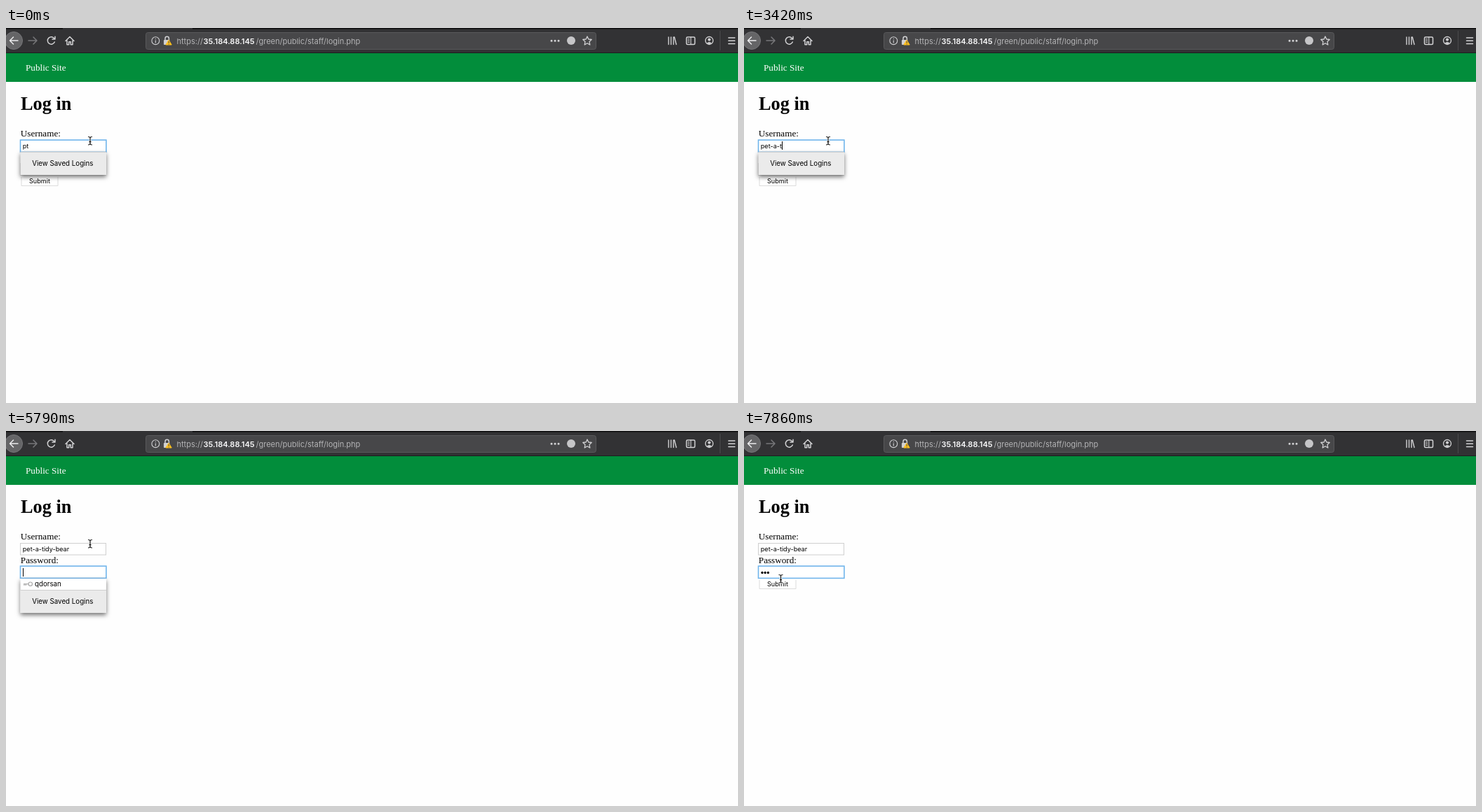
Recreate the animation shown at these times as an HTML page. Size 1044 by 536 pixels, loop 8000 ms.

```html
<!DOCTYPE html>
<html lang="en">
<head>
<meta charset="utf-8">
<title>Log in</title>
<style>
  html, body { margin: 0; width: 100%; height: 100%; overflow: hidden; background: #fefefe; }
  svg { display: block; }
  text { white-space: pre; }
  .serif { font: 13.2px "Liberation Serif", serif; }
  .ui { font: 9.1px Inter, sans-serif; }
  .menu { font: 9.75px Inter, sans-serif; }
  .url { font: 11px Inter, sans-serif; fill: #b4b4b6; }
  .icon { fill: none; stroke: #d2d2d4; stroke-width: 1.5; stroke-linecap: round; stroke-linejoin: round; }
  .idle { fill: #fff; stroke: #cfcfcf; }
  .focus { fill: #fff; stroke: #70b5ec; stroke-width: 1.6; }
  .popup { filter: drop-shadow(0 3px 3px rgba(0, 0, 0, .55)); }
</style>
</head>
<body>
<svg width="1044" height="536" viewBox="0 0 1044 536">
  <!-- browser toolbar -->
  <rect width="1044" height="36" fill="#323234"/>
  <path d="M0 .7H81M266 .7H1044" stroke="#0c0c0d" stroke-width="1.4"/>
  <path d="M0 35.5H1044" stroke="#1d1d1f"/>
  <rect x="199.5" y="6.5" width="642" height="24" rx="3" fill="#474749" stroke="#59595b"/>
  <circle cx="11" cy="18" r="12.5" fill="#656567" stroke="#77777a"/>
  <path d="M1018.5 4V32" stroke="#4b4b4d"/>
  <g class="icon">
    <path d="M17 18H5.5M10.5 13L5.5 18L10.5 23" stroke="#ececee"/>
    <path d="M32 18H44M39 13L44 18L39 23" stroke="#77777a"/>
    <path d="M69 15.3A5.2 5.2 0 1 0 69.3 20M70 12.3V16H66"/>
    <path d="M85 18.5L91 12.5L97 18.5M87 18V23.8H89.7V19.8H92.3V23.8H95V18"/>
    <g stroke-width="1.1">
      <circle cx="213.3" cy="18.2" r="5.4"/>
      <path d="M213.3 17.8V21M213.3 15.4V15.6"/>
    </g>
    <path d="M227 17V15A2.7 2.7 0 0 1 232.4 15V17"/>
    <rect x="225.8" y="17.5" width="7" height="6" fill="#d2d2d4" stroke-width="1"/>
    <path d="M232.2 17.5L236.2 24H228.2Z" fill="#ffbf1c" stroke="#ffbf1c" stroke-width="1"/>
    <path d="M232.2 19.2V21.4M232.2 23.2V23.3" stroke="#474749" stroke-width="1"/>
    <path d="M778 18.3H778.1M783 18.3H783.1M788 18.3H788.1" stroke-width="3"/>
    <path d="M829 12L830.8 16L835.2 16.5L832 19.5L832.8 24L829 21.8L825.2 24L826 19.5L822.8 16.5L827.2 16Z" stroke-width="1.3"/>
    <path d="M945 13V23.5M948.5 13V23.5M952 13V23.5M953.3 13L956 23.5" stroke-width="1.4"/>
    <rect x="970.5" y="13" width="12" height="10.5" rx="1.5"/>
    <path d="M976.8 13V23.5M972.6 15.7H974.6M972.6 18H974.6M972.6 20.3H974.6" stroke-width="1.1"/>
    <circle cx="1003" cy="18" r="5.5" stroke-width="1.3"/>
    <path d="M999.8 21.8Q1003 18.6 1006.2 21.8Q1003 24 999.8 21.8Z" fill="#d2d2d4" stroke-width=".6"/>
    <circle cx="1003" cy="16.6" r="1.8" fill="#d2d2d4" stroke-width=".5"/>
    <path d="M1030.5 14H1039.5M1030.5 18.2H1039.5M1030.5 22.4H1039.5"/>
  </g>
  <circle cx="806" cy="18" r="6" fill="#c6c6c8"/>
  <text class="url" y="22.5"><tspan x="243.5">https://</tspan><tspan x="281.5" fill="#f9f9fa" font-weight="600">35.184.88.145</tspan><tspan x="356.5">/green/public/staff/login.php</tspan></text>

  <!-- page -->
  <rect y="36" width="1044" height="41" fill="#028d3b"/>
  <text class="serif" x="28" y="60.5" fill="#fff">Public Site</text>
  <text x="21" y="116.5" style="font: bold 26.3px 'Liberation Serif', serif">Log in</text>
  <text class="serif" x="20.8" y="155">Username:</text>
  <text class="serif" x="20.8" y="188.5">Password:</text>
  <rect id="userBox"/>
  <rect id="passBox"/>
  <path d="M22 213V225.5H74V213" fill="#fff" stroke="#dcdcdc"/>
  <text class="ui" x="48" y="222.3" text-anchor="middle">Submit</text>
  <text id="userText" class="ui" x="23.8" y="172"/>
  <g id="dots">
    <circle cx="26" cy="202.5" r="1.65"/>
    <circle cx="30.2" cy="202.5" r="1.65"/>
    <circle cx="34.4" cy="202.5" r="1.65"/>
  </g>
  <rect id="caret" width="1" height="12"/>

  <!-- suggestion popups -->
  <g id="passPopup" class="popup">
    <rect x="20.5" y="211" width="122.5" height="49" fill="#fff"/>
    <circle cx="34.8" cy="218.7" r="2.7" fill="none" stroke="#aaa" stroke-width="1.2"/>
    <path d="M25 218.7H32M26 219V221M28.3 219V221" stroke="#aaa" stroke-width="1.2"/>
    <text class="menu" x="41" y="222">qdorsan</text>
  </g>
  <g id="savedLogins">
    <rect x="20.5" y="177.5" width="122.5" height="32.5" fill="#ebebeb"/>
    <path d="M20.5 177.5H143" stroke="#cfcfcf"/>
    <text class="menu" x="80.8" y="197" text-anchor="middle">View Saved Logins</text>
  </g>

  <g id="pointer" fill="none">
    <path id="beam" d="M-3 -5.5Q-.3 -5.5 0 -4Q.3 -5.5 3 -5.5M-3 6Q-.3 6 0 4.5Q.3 6 3 6M0 -4V4.5M-1.5 1.7H1.5" stroke="#fff" stroke-width="2.4"/>
    <use href="#beam" style="stroke: #000"/>
    <path d="M-3 -5.5Q-.3 -5.5 0 -4Q.3 -5.5 3 -5.5M-3 6Q-.3 6 0 4.5Q.3 6 3 6M0 -4V4.5M-1.5 1.7H1.5" stroke="#111" stroke-width="1.2"/>
  </g>
</svg>
<script>
const LOOP = 8000, TAB = 5790, FIRST_DOT = 6840, LAST_DOT = 7130;
const $ = id => document.getElementById(id);
const userName = "pet-a-tidy-bear";

// [time, text or length of the typed prefix, caret shown]
const typing = [
  [0, "pt", 0], [150, "pte", 0], [290, "pt", 0],
  [590, 1, 1], [740, 2, 1], [880, 1, 1], [1180, 2, 1], [1470, 3, 1], [1920, 3, 0],
  [2220, 4, 1], [2520, 5, 0], [2970, 5, 1], [3120, 6, 1],
  [3420, 7, 1], [3570, 8, 1], [3710, 9, 1], [3860, 10, 1], [4160, 10, 0],
  [4460, 11, 1], [4760, 11, 0],
  [5060, 12, 1], [5210, 13, 1], [5350, 14, 1], [5650, 15, 1]
];

function show(id, visible) {
  $(id).style.display = visible ? "" : "none";
}

function setField(id, y, focused) {
  const grow = focused ? .4 : 0;
  const box = { x: 20.5, y: y - grow, width: 122 + grow, height: 16.5 + 2 * grow };
  for (const key in box) $(id).setAttribute(key, box[key]);
  $(id).setAttribute("class", focused ? "focus" : "idle");
}

function draw(t) {
  const onPassword = t >= TAB;
  const [, typed, blink] = typing.findLast(step => step[0] <= t);
  const dotCount = [FIRST_DOT, 6980, LAST_DOT].filter(time => time <= t).length;

  setField("userBox", 160.5, !onPassword);
  setField("passBox", 193.5, onPassword);
  $("userText").textContent = typeof typed === "string" ? typed : userName.slice(0, typed);
  [...$("dots").children].forEach((dot, i) => dot.style.display = i < dotCount ? "" : "none");

  const caretX = onPassword
    ? 24 + 4.2 * dotCount
    : 23.8 + $("userText").getComputedTextLength();
  $("caret").setAttribute("x", Math.round(caretX));
  $("caret").setAttribute("y", onPassword ? 196 : 162);
  show("caret", onPassword ? t < 6390 || (t >= FIRST_DOT && t < 7570) : blink);

  show("passPopup", onPassword && t < FIRST_DOT);
  show("savedLogins", t < FIRST_DOT);
  $("savedLogins").setAttribute("transform", `translate(0 ${onPassword ? 50 : 0})`);
  $("savedLogins").setAttribute("class", onPassword ? "" : "popup");

  // the pointer moves in five hard steps along an eased path
  const p = Math.min(5, Math.max(0, Math.floor((t - LAST_DOT) / 146))) / 5;
  const ease = p * p * (3 - 2 * p);
  $("pointer").setAttribute("transform", `translate(${120 - 67.5 * ease} ${161 + 50 * ease})`);
}

const start = performance.now();
function tick() {
  draw((performance.now() - start) % LOOP);
  requestAnimationFrame(tick);
}
tick();
</script>
</body>
</html>
```
